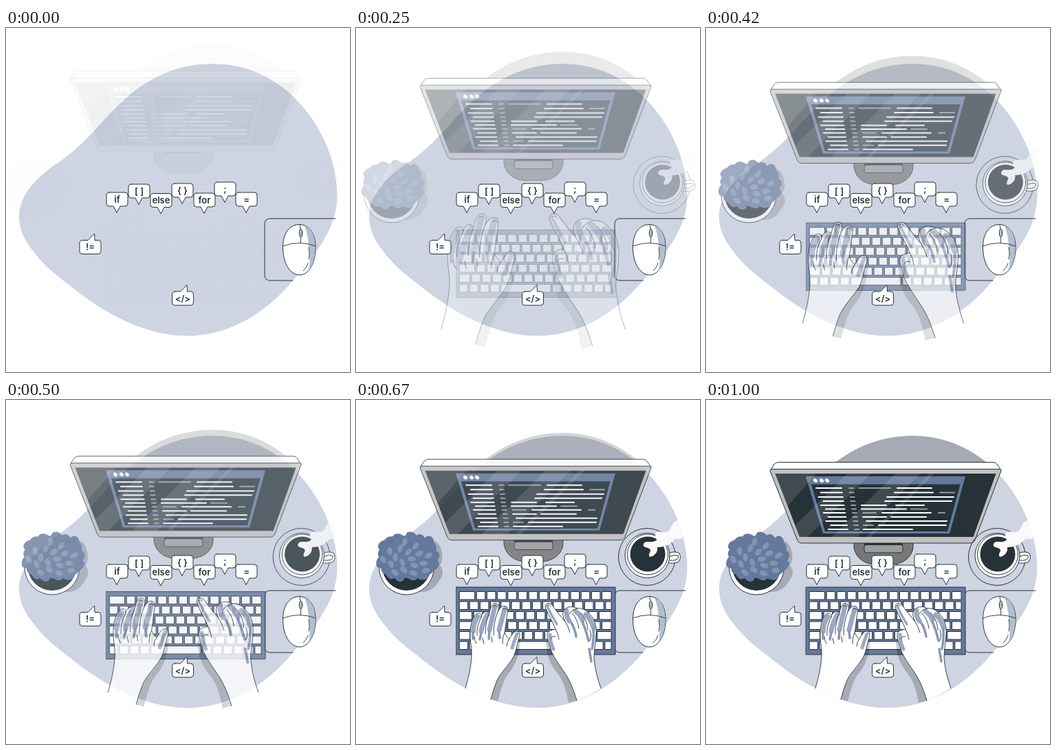
An HTML page for the animation above (1040 ms loop, 500 by 500 pixels).

```html
<!DOCTYPE html>
<html lang="en">
<head>
<meta charset="utf-8">
<title>Coding desk</title>
<style>
html, body { margin: 0; width: 100%; height: 100%; overflow: hidden; background: #fff; }
svg { display: block; width: 100vw; height: 100vh; }
.ink { stroke: #263238; stroke-width: 1; stroke-linejoin: round; stroke-linecap: round; }
.thin { stroke: #263238; stroke-width: .9; fill: none; stroke-linecap: round; stroke-linejoin: round; }
.white { fill: #fff; }
.dark { fill: #263238; }
.blue { fill: #64799d; }
.none { fill: none; }
.shade { fill: #000; fill-opacity: .2; }
.tint { fill: none; stroke: #9ba8c0; stroke-linecap: round; stroke-linejoin: round; }
.streak { fill: none; stroke: #8796b6; stroke-width: 3.5; stroke-linecap: round; }
text { font: 600 13px Inter, "Open Sans", sans-serif; fill: #263238; text-anchor: middle; }
</style>
</head>
<body>
<svg viewBox="0 0 500 500">
  <defs>
    <path id="left" d="M159 419C163 405 167 390 168 372C169 360 165 350 166 338C166 326 170 316 175 311C180 308 183 311 182 316C183 309 189 305 194 309C196 302 197 295 203 295.500C208 296 208 302 206 308C209 302 213 298 218 300C222 302 220 309 219 316C218 326 217 332 216 338C219 344 221 347 223 347C226 343 228 337 233 336C238 336 239 341 237 346C234 354 233 366 228 375C220 388 207 400 204 410C200 420 198 428 196 435"/>
    <path id="right" d="M356 419C351 405 347 390 346 374C346 362 349 350 349 340C350 328 346 317 340 312C335 305 328 302 322 303C315 299 306 300 302 306C299 312 302 318 304 322C298 315 290 305 285 298C281 294 275 295 275 301C279 312 286 322 290 333C287 334 281 334 279 338C276 343 280 352 283 362C287 376 302 392 310 408C315 418 318 427 321 437"/>
  </defs>

  <path fill="#ced4e1" d="M300 52C370 52 420 92 450 140C472 175 481 212 481.500 243C481 285 460 318 417 367C375 418 320 448 262 447.500C200 447 140 412 100 380C70 357 55 345 40 325C27 309 19 293 19 274C19 240 50 212 80 193C118 166 140 133 172 104C207 72 250 52 300 52Z"/>

  <g id="monitor">
    <path class="shade" d="M169 107L172 104C207 72 250 52 300 52C355 52 397 77 425 107Z"/>
    <path class="ink" fill="#787878" d="M215 206V213C217 231 233 239 246 239H270C284 239 300 230 301 213V206Z"/>
    <rect class="dark" x="230" y="206" width="56" height="8"/>
    <rect class="ink" fill="#9c9c9c" x="230" y="210.500" width="56" height="11.500" rx="3"/>
    <path class="ink white" d="M93.500 102L98 95Q100.500 90.500 106 90.500H417Q422 90.500 424 95L429 102Z"/>
    <path class="ink" fill="#c0c0c2" d="M96 100.500H426Q430 100.500 428.500 104L391 203Q389 208 384 208H139Q134.500 208 132.500 203L93.500 104Q92 100.500 96 100.500Z"/>
    <path class="dark" d="M100.500 107H421.500L388.500 199H136Z"/>
    <path class="blue" fill-rule="evenodd" d="M145 111H377L354 194H170ZM153 122.500L173 191H351L369.500 122.500Z"/>
    <g id="code" stroke-width="2" stroke-linecap="round"></g>
    <path fill="#fff" fill-opacity=".12" d="M100.500 107H160L119 154ZM205 107H240L148 199H136L130 182ZM275 107H312L220 199H183ZM325 107H332L240 199H233Z"/>
  </g>

  <g id="plant">
    <path class="shade" d="M95 203Q120 200 124 218Q128 232 122 240Q130 252 122 261Q113 278 98 279Q75 280 80 240Z"/>
    <circle class="ink white" cx="73.500" cy="243" r="40"/>
    <circle class="dark" cx="73.500" cy="241.500" r="35.500"/>
    <g id="leaves"></g>
  </g>

  <g id="cup">
    <circle class="ink none" cx="423" cy="228" r="41.500"/>
    <path class="ink white" d="M452 224Q460 219 469 222Q474 228 469 235Q461 239 452 236ZM456 227.500Q462 224.500 468 226Q470 229 466 232Q461 234 455 233Z"/>
    <circle class="ink white" cx="423.500" cy="226" r="32.500"/>
    <circle class="ink none" cx="424" cy="224.500" r="29.500"/>
    <circle class="dark" cx="424" cy="224" r="25.500"/>
    <path fill="#fafafa" d="M468 175C458 178 460 184 455 190C447 195 440 188 435 194C434 199 440 201 436 204C430 209 421 203 418 209C416 216 426 213 428 218C428 222 424 224 427 228C434 227 439 221 438 214C446 214 455 211 461 205C466 199 471 204 475 201Q474 187 468 175Z"/>
  </g>

  <path class="ink none" d="M479 277H384Q376 277 376 285V359Q376 367 384 367H417"/>
  <path class="ink white" d="M426.500 285.500C443 286 450 302 450 319C450 343 439 359 427 359C413 359 402 342 402.500 317C403 299 411 286 426.500 285.500Z"/>
  <path fill="#b3becf" d="M434 287.500C445 291 449.500 304 449.500 319C449.500 333 446 345 440 352Q443 338 440 318Q439 300 434 287.500Z"/>
  <path class="thin" d="M402.500 317Q426 308 450 317M427 286L428 292M428.500 304V312.500M440 319Q442 329 440 336M439 342Q437 349 432 353"/>
  <ellipse class="ink" fill="#b3becf" cx="428.500" cy="298" rx="2.200" ry="6"/>

  <g id="keyboard">
    <rect class="ink blue" x="145.500" y="272" width="231.500" height="98"/>
    <g id="keys" class="ink white"></g>
  </g>

  <g id="hands">
    <path class="shade" d="M196 435C201 417 205 406 213 396C224 384 230 375 233 352L239 348C238 372 230 388 222 397C213 408 210 424 206 438Z"/>
    <path class="shade" d="M321 437C315 415 308 402 299 390C289 378 284 368 281 350L276 352C277 372 283 386 292 396C302 408 306 424 309 440Z"/>
    <use href="#left" class="white"/>
    <path class="white" d="M159 419L196 435Q176 429 159 419Z"/>
    <g class="tint">
      <path stroke-width="7" d="M177 315Q170 326 170.500 336M191 312Q184 324 182 336M202 300Q198 316 194 334M216 304Q212 318 208 334"/>
      <path stroke-width="5" d="M234 340Q230 350 227 360"/>
    </g>
    <path class="streak" d="M170 338V347M182 338L180 348M194 336L193 347M208 336L209 346"/>
    <use href="#left" class="thin"/>
    <path class="thin" d="M182 316Q175 328 176 342M194 309Q188 322 188 340M206 308Q200 322 200 342M216 338Q212 346 213 354M199 300Q202 297 205 300M214 304Q217 301 219 305M223 347Q219 352 219 358M172 344Q172 350 175 354M184 346L186 354M197 344L198 352"/>
    <use href="#right" class="white"/>
    <path class="white" d="M356 419L321 437Q340 430 356 419Z"/>
    <g class="tint">
      <path stroke-width="7" d="M306 306Q305 314 310 321M319 307Q326 312 329 320M334 312Q342 319 345 331"/>
      <path stroke-width="5" d="M282 341Q282 352 287 362"/>
      <path stroke-width="3.500" d="M278 300Q284 313 292 326"/>
    </g>
    <path class="streak" d="M345 333Q346 348 343 362M329 322Q335 336 338 350M313 324Q318 332 320 344M339 362L342 380"/>
    <use href="#right" class="thin"/>
    <path class="thin" d="M304 322Q309 330 311 338M310 311Q314 304 322 303M314 310Q322 318 324 332M326 309Q336 318 337 334M290 333Q294 340 295 348M277 299Q280 296 283 300M283 347Q286 342 290 344M340 334Q343 342 340 350"/>
  </g>

  <g id="bubbles"></g>
</svg>
<script>
const el = id => document.getElementById(id);

// Code lines: row, start, end; negative row numbers are grey
const rows = [128, 134.5, 141, 147, 153, 158.5, 164, 170, 176, 182, 188];
const lines = [
  [-1, 222, 268], [1, 278, 328], [2, 274, 330], [-2, 340, 361], [3, 263, 360],
  [4, 260, 357], [5, 226, 262], [5, 276, 317], [6, 226, 291], [-6, 298, 321],
  [-7, 228, 247], [7, 256, 327], [-7, 338, 347], [8, 228, 262], [8, 269, 320],
  [9, 233, 350], [10, 251, 349], [-10, 229, 243], [11, 229, 300]
];
const line = (x1, x2, y, color) => `<path stroke="${color}" d="M${x1} ${y}H${x2}"/>`;
el('code').innerHTML =
  rows.map((y, i) => line(160 + i * 1.8 + (i % 2) * 5, 197 + i * .9, y, '#fff') +
    line(208 + i * .8, 214 + i * .8, y, '#929a9e')).join('') +
  lines.map(([r, a, b]) => line(a, b, rows[Math.abs(r) - 1], r < 0 ? '#929a9e' : '#fff')).join('') +
  [159, 168, 176].map(x =>
    `<ellipse class="white" cx="${x}" cy="117" rx="3.300" ry="2.500" transform="rotate(35 ${x} 117)"/>`).join('');

// Bush: an uneven, slightly squared rim of leaves, then lighter leaves on a spiral
const leaf = (x, y, rx, ry, angle, color) =>
  `<ellipse fill="${color}" rx="${rx}" ry="${ry}" transform="translate(${x} ${y}) rotate(${angle})"/>`;
const square = v => Math.sign(v) * Math.abs(v) ** .8;
let bush = leaf(76, 228, 42, 31, 0, '#64799d');
for (let i = 0; i < 17; i++) {
  const a = i * Math.PI * 2 / 17, r = 1 + .05 * Math.sin(i * 2.6);
  bush += leaf(75.5 + 37 * r * square(Math.cos(a)), 228 + 27 * r * square(Math.sin(a)), 7.5, 10, i * 21 + 40, '#64799d');
}
for (let i = 0; i < 18; i++) {
  const a = i * 2.4, r = Math.sqrt((i + .5) / 18);
  bush += leaf(75 + 36 * r * Math.cos(a), 231 + 27 * r * Math.sin(a), 6, 3.8, i * 67, '#8394b1');
}
el('leaves').innerHTML = bush;

// Keys: a first key of its own width, then an even pitch, the last one filling the row
const key = (x, end, y) => `<rect x="${x}" y="${y}" width="${end - x}" height="11.500"/>`;
let keys = '';
[22, 12, 18, 22, 15, 12].forEach((first, r) => {
  const y = 278.5 + r * 14.5, lastAt = [355, 349, 342, 345, 340, 355][r];
  let x = 150.5, w = first;
  while (x < lastAt) {
    keys += key(x, x + w, y);
    x += w + 3;
    w = r == 5 && x > 205 && x < 220 ? 72 : 12.2;
  }
  keys += key(x, 371, y);
});
el('keys').innerHTML = keys;

// Speech bubbles: text, left, top, tail pointing up
const bubble = ([label, x, y, up]) => {
  const top = up ? 'h8l9.500-9.500l.5 9.500h5' : 'h23';
  const bottom = up ? 'h-23' : 'h-7l-5 9.500l-5-9.500h-6';
  return `<path class="ink white" d="M${x + 4} ${y}${top}q4 0 4 4v12q0 4-4 4${bottom}q-4 0-4-4v-12q0-4 4-4Z"/>
    <text x="${x + 15.5}" y="${y + 14.5}">${label}</text>`;
};
el('bubbles').innerHTML = [
  ['if', 146, 239], ['[ ]', 178, 227], ['else', 210, 240.5], ['{ }', 241, 226],
  ['for', 273, 240], [';', 303, 224], ['=', 334, 239],
  ['!=', 107, 308.5, true], ['&lt;/&gt;', 241.5, 383, true]
].map(bubble).join('');

const bezier = (x1, y1, x2, y2) => t => {
  const at = (s, a, b) => 3 * (1 - s) * s * ((1 - s) * a + s * b) + s ** 3;
  let lo = 0, hi = 1;
  for (let i = 0; i < 30; i++) {
    const mid = (lo + hi) / 2;
    if (at(mid, x1, x2) < t) lo = mid; else hi = mid;
  }
  return at(lo, y1, y2);
};
const easeOut = bezier(0, 0, .58, 1);
const overshoot = bezier(.36, -.01, .5, 1.38);

function pose(id, amount, transform) {
  el(id).setAttribute('transform', transform);
  el(id).setAttribute('opacity', Math.max(0, Math.min(1, amount)));
}

const LOOP = 1040, STEPS = 25;
const start = performance.now();
function draw() {
  const time = (performance.now() - start) % LOOP;
  const step = Math.min(STEPS - 1, Math.floor((time + 3) * STEPS / LOOP));
  const t = (step + 1) / STEPS;
  const slow = easeOut(t), spring = overshoot(t), away = 30 * (1 - spring);
  pose('monitor', slow, `translate(0 ${-30 * (1 - slow)})`);
  pose('plant', spring, `translate(${-away} 0)`);
  pose('cup', spring, `translate(${away} 0)`);
  pose('keyboard', spring, `translate(0 ${away})`);
  pose('hands', spring, `translate(257.5 366.5) scale(${1.5 - .5 * spring}) translate(-257.5 -366.5)`);
  requestAnimationFrame(draw);
}
draw();
</script>
</body>
</html>
```
